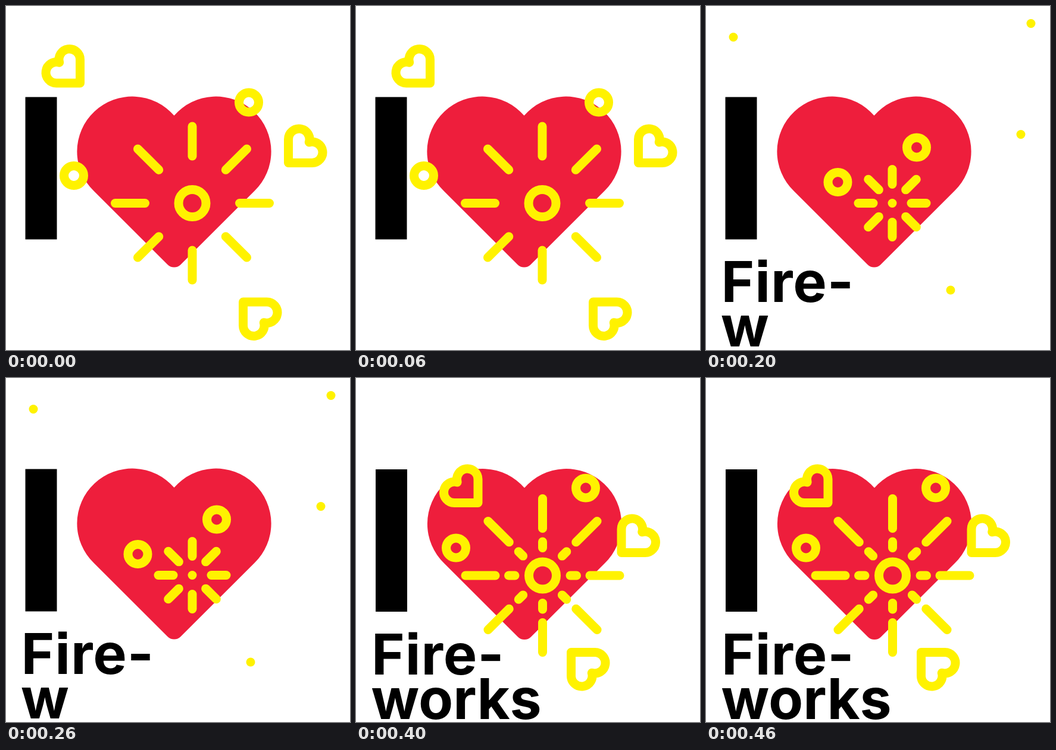
Write an HTML page that moves like this. It is 578 px wide and 580 px high and loops after 500 ms.

```html
<!DOCTYPE html>
<html lang="en">
<head>
<meta charset="utf-8">
<title>I love fireworks</title>
<style>
  html, body { margin: 0; width: 100%; height: 100%; overflow: hidden; background: #fff; }
  svg { display: block; }
  text { font: 700 95px Inter, sans-serif; font-feature-settings: "ss07"; }
  #line1 { letter-spacing: .01em; }
  #sparks { fill: none; stroke: #fff200; stroke-width: 15; stroke-linecap: round; stroke-linejoin: round; }
</style>
</head>
<body>
<svg width="578" height="580" viewBox="0 0 578 580">
  <defs>
    <path id="heart" d="M0 0V-39.75A17.75 17.75 0 1 0 -34.8 -34.8A17.75 17.75 0 1 0 -39.75 0Z"/>
  </defs>
  <g id="scene">
    <path d="M32.5 153.5H85.5V393.5H32.5Z"/>
    <path fill="#ee1e3c" d="M282.5 184.8A92.8 92.8 0 1 0 147.7 312.1L271.5 435.9A15.6 15.6 0 0 0 293.5 435.9L417.3 312.1A92.8 92.8 0 1 0 282.5 184.8Z"/>
    <text id="line1" x="25.5" y="499"></text>
    <text id="line2" x="25" y="574"></text>
    <g id="sparks"></g>
  </g>
</svg>
<script>
const STEP = 100;
const CENTER = [313, 332.5];
const FLIPS = ['1 1', '-1 1', '-1 -1'];
const WORDS = ['Fire-', 'works'];

// rays: inner and outer radius; hearts: corner points; core: radius of the central ring
const poses = [
  { typed: 0, core: 23, rays: [[79.5, 129.5]], rings: [[408, 162.5], [114, 286]],
    hearts: [[124.5, 130], [474.5, 264.5], [398.5, 499]] },
  { typed: 2, rays: [[102.5, 129.5]], rings: [[546, 29.5], [387, 479]],
    hearts: [[69, 74.5], [500.5, 238.5]] },
  { typed: 6, rays: [[32, 57]], rings: [[354, 238.5], [221.5, 297]],
    dots: [CENTER, [46, 52.5], [546, 29.5], [529, 216.5], [411, 479]] },
  { typed: 8, core: 23, rays: [[46.5, 57]], rings: [[349, 238.5], [204.5, 294]],
    hearts: [[251.5, 245], [378.5, 310], [335.5, 407]] },
  { typed: 10, shift: 0.5, core: 23, rays: [[46.5, 57], [79.5, 129.5]], rings: [[385.5, 185], [167.5, 286]],
    hearts: [[204.5, 210], [445.5, 294], [361, 462]] },
];

const $ = id => document.getElementById(id);
const ring = ([x, y], r = 16.5) => `<circle cx="${x}" cy="${y}" r="${r}"/>`;
const dot = ([x, y]) => `<path d="M${x} ${y}h0"/>`;
const heart = (p, i) => `<use href="#heart" transform="translate(${p}) scale(${FLIPS[i]})"/>`;
const burst = ([from, to]) => Array.from({ length: 8 }, (_, i) =>
  `<path d="M${from} 0H${to}" transform="translate(${CENTER}) rotate(${i * 45})"/>`).join('');

function draw({ typed, core, rays, rings, hearts = [], dots = [], shift = 0 }) {
  $('line1').textContent = WORDS[0].slice(0, typed);
  $('line2').textContent = WORDS[1].slice(0, Math.max(0, typed - WORDS[0].length));
  $('scene').setAttribute('transform', `translate(${shift} ${shift})`);
  $('sparks').innerHTML = [
    ...rays.map(burst),
    core ? ring(CENTER, core) : '',
    ...rings.map(p => ring(p)),
    ...hearts.map(heart),
    ...dots.map(dot),
  ].join('');
}

const start = performance.now();
let shown = -1;
function tick() {
  const index = Math.floor((performance.now() - start) / STEP) % poses.length;
  if (index !== shown) draw(poses[shown = index]);
  requestAnimationFrame(tick);
}
tick();
</script>
</body>
</html>
```
